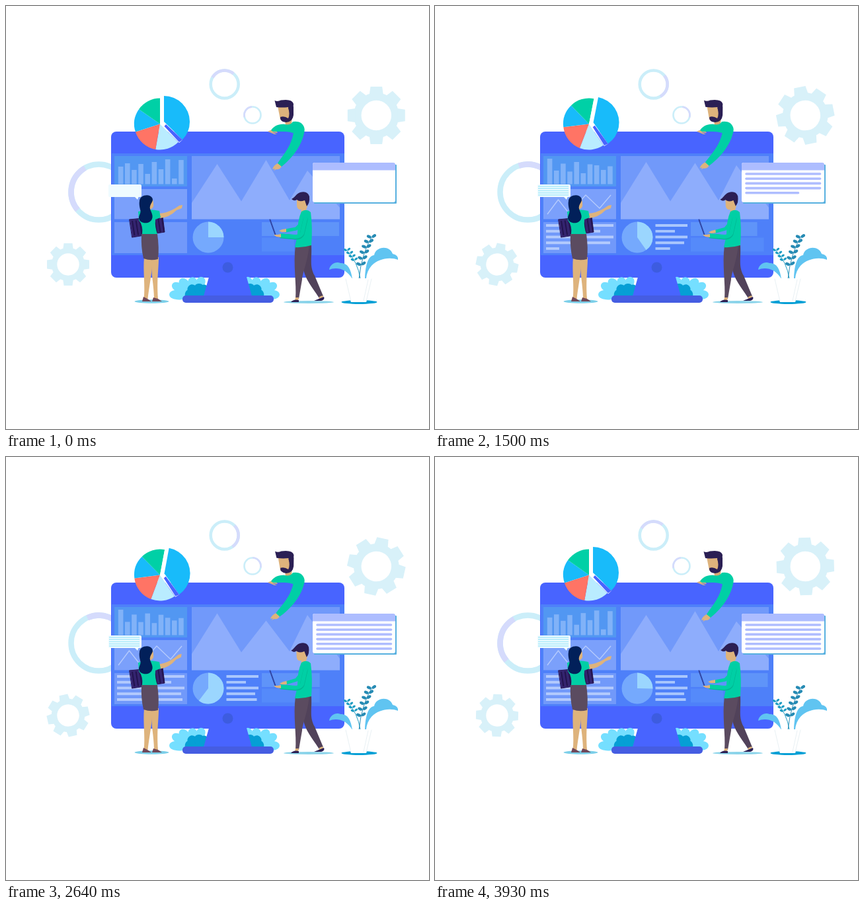
Recreate the animation shown at these times as an HTML page with a canvas. Size 640x640 px, loop 4 s.

```html
<!DOCTYPE html>
<html lang="en">
<head>
<meta charset="utf-8">
<title>Dashboard team</title>
<style>
  html, body { margin: 0; width: 100%; height: 100%; overflow: hidden; background: #fff; }
  canvas { display: block; width: 640px; height: 640px; }
</style>
</head>
<body>
<canvas id="stage" width="640" height="640"></canvas>
<script>
const ctx = document.getElementById('stage').getContext('2d');
const LOOP = 4000;
const FPS = 14;
const SKIN = '#deb37c', GREEN = '#00cfa5', HAIR = '#2b1f54', TROUSERS = '#5b4b60', BLUE = '#4864ff';
const rad = deg => deg * Math.PI / 180;
const clamp = v => Math.max(0, Math.min(1, v));
const smooth = p => (1 - Math.cos(Math.PI * p)) / 2;

// Four poses, one second apart, eased and wrapping round.
function keyed(t, poses) {
  const i = Math.floor(t / 1000) % 4;
  return poses[i] + (poses[(i + 1) % 4] - poses[i]) * smooth((t % 1000) / 1000);
}

function shape(d, color) {
  ctx.fillStyle = color;
  ctx.fill(new Path2D(d));
}

function line(d, color, width, cap = 'round') {
  ctx.strokeStyle = color;
  ctx.lineWidth = width;
  ctx.lineCap = cap;
  ctx.lineJoin = 'round';
  ctx.stroke(new Path2D(d));
}

function box(x, y, w, h, color, radius = 0) {
  ctx.fillStyle = color;
  ctx.beginPath();
  ctx.roundRect(x, y, w, h, radius);
  ctx.fill();
}

function oval(x, y, rx, ry, color, turn = 0) {
  ctx.fillStyle = color;
  ctx.beginPath();
  ctx.ellipse(x, y, rx, ry, rad(turn), 0, 2 * Math.PI);
  ctx.fill();
}

function slice(x, y, r, from, to, color) {
  ctx.fillStyle = color;
  ctx.beginPath();
  ctx.moveTo(x, y);
  ctx.arc(x, y, r, rad(from), rad(to));
  ctx.fill();
}

function arc(x, y, r, width, from, to, color) {
  ctx.strokeStyle = color;
  ctx.lineWidth = width;
  ctx.lineCap = 'butt';
  ctx.beginPath();
  ctx.arc(x, y, r, rad(from), rad(to));
  ctx.stroke();
}

function turned(x, y, deg, draw) {
  ctx.save();
  ctx.translate(x, y);
  ctx.rotate(rad(deg));
  ctx.translate(-x, -y);
  draw();
  ctx.restore();
}

function gear(x, y, size, deg) {
  const color = '#d8f1f9';
  ctx.save();
  ctx.translate(x, y);
  ctx.scale(size, size);
  ctx.rotate(rad(deg));
  arc(0, 0, 28.5, 11.5, 0, 360, color);
  for (let i = 0; i < 8; i++) {
    shape('M-10.5 -32 L-8.8 -43.5 L8.8 -43.5 L10.5 -32 Z', color);
    ctx.rotate(Math.PI / 4);
  }
  ctx.restore();
}

function ring(x, y, r, width, start, sway) {
  const from = start + 130 * sway;
  arc(x, y, r, width, 0, 360, '#cbeef9');
  arc(x, y, r, width, from, from + 100, '#d5dbfc');
}

// Text bars that are written one after another.
function textRows(t, x, top, gap, widths, start, each, color, thick, cap) {
  widths.forEach((w, i) => {
    const p = clamp((t - start - i * each) / each);
    if (p > 0) line(`M${x} ${top + i * gap} h${w * p}`, color, thick, cap);
  });
}

function petals(x, y, list, color) {
  for (const [length, deg] of list) {
    turned(x, y, deg, () =>
      shape(`M${x} ${y} C${x + length * .4} ${y - 9} ${x + length} ${y - 10} ${x + length} ${y}
        C${x + length} ${y + 10} ${x + length * .4} ${y + 9} ${x} ${y} Z`, color));
  }
}

function bush() {
  petals(286, 439, [[39, 184], [39, 208], [34, 229], [29, 260], [31, 292]], '#75dfff');
  petals(293, 441, [[23, 198], [24, 228], [21, 266], [21, 300]], '#069fd5');
}

function monitor() {
  box(159, 190, 353, 221, BLUE, 8);
  box(160, 223, 352, 154, '#4e80f9');
  ctx.save();
  bush();
  ctx.translate(661, 0);
  ctx.scale(-1, 1);
  bush();
  ctx.restore();
  shape('M307 410 H364 L372 439 H299 Z', BLUE);
  box(267, 438, 138, 11, '#455de2', 5);
  oval(335.5, 395.5, 8, 8, '#3d5ce0');
}

function barChart(t) {
  box(164, 227, 110, 46, '#5297f2');
  const tops = [
    [243, 238, 248, 239, 254, 236, 247, 232, 261, 233],
    [231, 251, 238, 247, 239, 245, 236, 251, 245, 248],
    [231, 247, 239, 254, 233, 261, 243, 231, 251, 237]
  ];
  for (let i = 0; i < 10; i++) {
    const y = keyed(t, [0, 1, 2, 1].map(k => tops[k][i]));
    box(169.8 + i * 10.15, y, 7.6, 269.5 - y, '#81b2f8');
  }
}

function sparkline(t) {
  box(164, 277, 110, 45.5, '#7ba0fb');
  const grown = 147 * clamp((t - 220) / 1120);
  if (!grown) return;
  ctx.save();
  ctx.setLineDash([grown, 300]);
  line('M170 315 L186.500 293 L203 314 L228 286 L249 306 L267 285', '#b4cafd', 1.4, 'butt');
  ctx.restore();
}

function mountains(t) {
  box(281, 227, 224, 95.500, '#7199fa');
  const a = keyed(t, [239, 230, 242, 233]);
  const b = keyed(t, [233, 244, 231, 258]);
  const c = keyed(t, [249, 235, 247, 234]);
  shape(`M281 322.500 V298 L319.500 ${a} L356 295.500 L393.500 ${b} L429 294
    L456 ${c} L505 305 V322.500 Z`, '#8eadfc');
}

function screen(t) {
  barChart(t);
  sparkline(t);
  mountains(t);
  box(164, 327, 110, 47, '#7199fa');
  textRows(t, 168, 332, 8.75, [102, 82, 102, 97, 99], 0, 357, '#b3cafd', 3.8, 'butt');
  textRows(t, 333.5, 332, 8.75, [48.500, 29.500, 48.500, 43.500, 46], 200, 290, '#aac7fd', 3.8, 'butt');
  box(387, 327, keyed(t, [504, 482, 493, 463]) - 387, 21, '#5f94f9');
  box(387, 350.500, keyed(t, [436, 504, 491, 464]) - 387, 21, '#558afa');
  oval(306, 350, 23.500, 23.500, '#75a9fd');
  slice(306, 350, 23.500, -90, keyed(t, [0, -45, 155, 110]), '#9bd6fe');
}

function pie(sway) {
  turned(233, 178.500, 13 * sway, () => {
    slice(233, 178.500, 39, 45, 100, '#b9ecff');
    slice(233, 178.500, 39, 100, 162, '#ff7465');
    slice(233, 178.500, 39, 162, 215, '#18bbfa');
    slice(233, 178.500, 39, 215, 270, '#00d0a6');
    // White gap between the pie and the pulled-out slice
    shape('M233 178.500 V138 H239 V175 L267 202.500 L262 207 Z', '#fff');
    shape('M239.500 182 L262 206 L267 202.500 L242 179 Z', BLUE);
    slice(239, 175, 39, -90, 44, '#18bbfa');
  });
}

function messageWindow(t) {
  box(466, 240, 125, 59, '#57b0df', 1);
  box(464, 237, 125, 60, '#fff', 3);
  box(464, 237, 125, 11.500, '#adbdff', [3, 3, 0, 0]);
  textRows(t, 471, 254, 7.2, Array(6).fill(111.500), 230, 270, '#afbdff', 3.6);
}

function bubble(t) {
  shape('M194 288 L199 293 L201 288 Z', '#effbff');
  box(155, 270, 50, 19, '#effbff', 2);
  textRows(t, 156, 272.800, 3.3, Array(5).fill(46), 0, 200, '#a9e9fa', 1.500, 'butt');
}

function leaningMan(t) {
  const swing = (1 - Math.cos(Math.PI * t / 1000)) / 2;
  turned(424, 178, 1.500 * swing, () => {
    shape('M421 165 L433 164 L432 180 L423 181 Z', '#d7a873');
    shape('M411 151 L427 149 L432 166 Q426 176 415 172 Z', SKIN);
    shape('M427 154 L435 152 V165 Q434 175 424 176 Q414 175 415 168 Q421 166 427 170 Q430 164 427 154 Z', HAIR);
    shape('M406.500 143 Q411 145 416 142.500 Q433 140 435 148 L434 163 L429 161 L427 153 Q418 154 409 153 Z', HAIR);
  });
  shape('M396 190 Q402 186 408 188 L411 192 L403 191 L410 194 H406 L399 191 Z', SKIN);
  shape('M401 188 C405 182 412 178 422 179 Q430 181 434 175 Q450 173 451 187 L436 193 C430 189 415 190 404 190 Z', GREEN);
  turned(443, 188, 5 * swing, () => {
    shape('M411 238 L417 242 Q415 248 409 247 L405 249 L407 246 L403 247 Q405 241 411 238 Z', SKIN);
    shape('M436 184 C442 171 455 180 451 192 C447 213 431 232 417 243 L411 238 C421 223 431 213 435 192 Z', GREEN);
  });
}

function folder() {
  shape('M187 323 L237 318 L240 342 L191 350 Z', '#34246f');
  for (let i = 0; i < 9; i++) {
    const x = 191 + i * 5.6, y = 325 - i * .6;
    line(`M${x} ${y} l3.500 22`, '#21134c', 1.800, 'butt');
  }
  line('M187 323 L237 318 L240 342 L191 350 Z', '#2b1959', 1);
}

function woman(t) {
  const lift = Math.max(0, Math.sin(Math.PI * t / 1000));
  oval(220.500, 447, 26, 2.800, '#7ccfe9');
  folder();
  shape('M209 380 H221 C222 400 218 415 214.500 443 H208.500 C211 425 207 402 209 380 Z', SKIN);
  shape('M220 380 H231 C231 400 228 412 230 443 H224 C224 423 219 405 220 380 Z', SKIN);
  shape('M208 440 L214 443 L220 447 H206 Z M223 441 L230 443 L236 447 H221 Z', '#70485a');
  shape('M205 345 H229 Q232 366 230 383 Q219 386 208 382 Q204 365 205 345 Z', TROUSERS);
  turned(228, 316, -5 * lift, () => {
    shape('M231 314 Q245 313 256 306 L262 302 L267 301 L266 306 L258 309 Q247 320 233 321 Z', SKIN);
  });
  shape('M217 290 Q223 291 223 298 Q224 306 219 307 L218 315 L211 313 Z', SKIN);
  shape('M200 311 Q216 306 232 310 L234 320 L226 323 Q225 334 229 345 H206 Q208 333 201 324 Z', GREEN);
  shape(`M202 295 C202 286 217 283 221 290 C224 295 219 298 218 303 C216 308 224 315 221 322
    C218 331 202 330 201 321 C201 316 205 313 203 308 Q201 300 202 295 Z`, '#02205a');
}

function laptopMan(t) {
  const beat = (1 + Math.cos(Math.PI * t / 1000)) / 2;
  oval(458, 448, 38, 2, '#8bd4ea');
  shape('M449 362 H462 C463 383 459 394 467 408 L480 439 L474 442 C462 423 448 409 449 386 Z', '#51425a');
  shape('M438 362 L459 361 C456 389 449 402 448 414 L443 443 H438 C440 420 434 392 438 362 Z', TROUSERS);
  shape('M474 440 L479 438 L481 443 L473 446 Z M438 441 H443 L442 446 H437 Z', SKIN);
  shape('M431 448 Q435 443 443 445 V448 Z M466 446 L481 440 Q483 444 477 446 Z', HAIR);
  turned(450, 309, -4 * (1 - beat), () => {
    shape('M440 293 L455 291 L456 303 L453 312 L446 314 L447 308 Q440 309 440 301 Z', SKIN);
    shape(`M432 292 C436 291 439 284 445 282 Q456 279 459 288 Q460 298 455 303 L452 294
      Q444 297 440 293 Q436 296 432 292 Z`, HAIR);
  });
  shape('M447 311 Q455 306 461 312 Q464 334 462 362 Q449 366 437 365 Q440 352 441 345 Q441 324 447 311 Z', GREEN);
  turned(440, 333, -10 * (1 - beat), () => {
    line('M445 331 L439 337 L423 340', GREEN, 5);
    shape('M424 337 V342 L417 342 L413 340 L418 338 Z', SKIN);
  });
  line('M399.500 323.500 L407.500 346', '#3045a4', 2);
  line('M407 347 H421', '#8ba8da', 1.500);
  line('M453 323 L448 345 Q446 350 438 350 L417 348', '#00b892', 7);
  line('M453 322 L448 344 Q445 349 438 349 L417 347.500', GREEN, 6);
  shape('M416 345 V350 L409 349 L405 346 L411 346 Z', SKIN);
}

// A stem with pairs of oval leaves running to its tip.
function sprig(x, y, dx, dy, pairs, first, size, color) {
  line(`M${x} ${y} Q${x + dx * .2} ${y + dy * .6} ${x + dx} ${y + dy}`, color, 1);
  for (let i = 0; i < pairs; i++) {
    const p = first + (1 - first) * i / (pairs - 1);
    const px = x + dx * (.4 * p * (1 - p) + p * p);
    const py = y + dy * (1.2 * p * (1 - p) + p * p);
    oval(px - size, py - 1, size, size * .6, color, 25);
    oval(px + size, py - 2, size, size * .6, color, -35);
  }
}

function plant() {
  oval(534.500, 448, 27, 3, '#069fd5');
  shape('M543 412 C544 391 548 378 557 377 C559 364 580 361 585 375 Q594 377 593 384 C580 379 562 383 553 393 Q546 401 545 412 Z', '#60c4f1');
  shape('M489 399 C490 391 499 386 506 389 C516 388 522 397 524 413 C517 401 508 397 499 397 Q493 397 489 399 Z', '#60c4f1');
  sprig(536, 412, -20, -42, 4, .6, 2.700, '#1c9cc3');
  sprig(534, 413, 19, -63, 6, .3, 3.700, '#268bb4');
  shape('M513 412 H554 L545 448 H522 Z', '#fff');
  line('M514 413 L522 447 M553 413 L545 447 M548 414 L541 446', '#e2ecf0', .8);
}

function draw(t) {
  const sway = (1 - Math.cos(2 * Math.PI * t / LOOP)) / 2;
  ctx.fillStyle = '#fff';
  ctx.fillRect(0, 0, 640, 640);
  gear(560.3, 165.500, 1, 90 * t / LOOP);
  gear(94, 391, .735, -90 * t / LOOP);
  ring(140.500, 281.500, 42, 8.500, 140, sway);
  ring(330.700, 118.500, 21, 4.500, 210, sway);
  ring(373, 165, 12.500, 2.700, 165, sway);
  monitor();
  screen(t);
  pie(sway);
  leaningMan(t);
  messageWindow(t);
  woman(t);
  bubble(t);
  plant();
  laptopMan(t);
}

const began = performance.now();
function tick() {
  const t = (performance.now() - began) % LOOP;
  draw(Math.floor((t + 1) * FPS / 1000) * 1000 / FPS % LOOP);
  requestAnimationFrame(tick);
}
tick();
</script>
</body>
</html>
```
